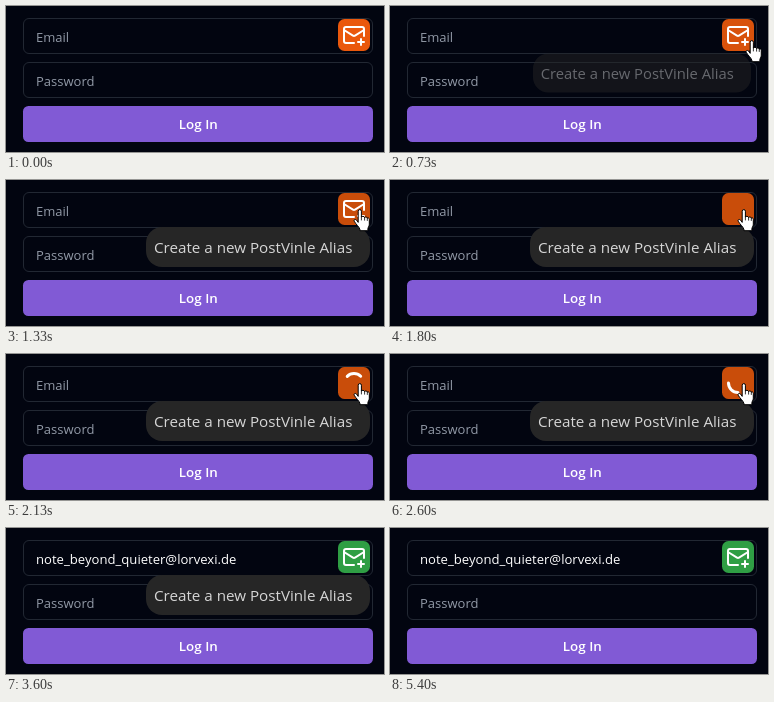
These frames come from a looping animation (378 by 146 pixels, 5.54 s). An HTML page:

```html
<!DOCTYPE html>
<html lang="en">
<head>
<meta charset="utf-8">
<title>Log in with an alias</title>
<style>
  html, body { margin: 0; width: 100%; height: 100%; overflow: hidden; background: #020510; }
  svg { display: block; width: 100%; height: 100%; font: 13px "Open Sans", "Noto Sans", sans-serif; }
  .field { fill: none; stroke: #222833; }
  .hint { fill: #929aa7; }
  .line { fill: none; stroke: #fff; stroke-width: 2; stroke-linecap: round; stroke-linejoin: round; }
</style>
</head>
<body>
<svg viewBox="0 0 378 146">
  <rect width="378" height="146" fill="#020510"/>
  <rect class="field" x="17.5" y="12.5" width="349" height="35" rx="5.5"/>
  <rect class="field" x="17.5" y="56.5" width="349" height="35" rx="5.5"/>
  <text id="hint" class="hint" x="30" y="36">Email</text>
  <text id="mail" x="30" y="35.5" font-size="13.1" fill="#fff">note_beyond_quieter@lorvexi.de</text>
  <text class="hint" x="30" y="80">Password</text>
  <rect x="17" y="100" width="350" height="36" rx="5.5" fill="#815ad5"/>
  <text x="192.3" y="123" font-size="13.4" font-weight="600" fill="#fff" text-anchor="middle">Log In</text>

  <rect id="button" x="332" y="13" width="32" height="32" rx="6.5"/>
  <g id="icon" class="line" transform="translate(336 17)">
    <path d="M22 13V6a2 2 0 0 0-2-2H4a2 2 0 0 0-2 2v12c0 1.1.9 2 2 2h8"/>
    <path d="m22 7-8.97 5.7a1.94 1.94 0 0 1-2.06 0L2 7M19 16v6M16 19h6"/>
  </g>
  <path id="spinner" class="line" style="stroke-width:3" d="M-9.5 0A9.5 9.5 0 0 1 0 -9.5"/>

  <g id="tip">
    <rect x="140" y="47" width="224" height="40" rx="16" fill="#262626"/>
    <text x="148" y="73" font-size="15.2" fill="#d6d6d6">Create a new PostVinle Alias</text>
  </g>

  <g id="hand" stroke="#000" stroke-linejoin="round" stroke-linecap="round">
    <path fill="#fff" d="M5.2 13V2.2a1.6 1.6 0 0 1 3.2 0V8c.5-1 2.9-.9 3.2.5.5-.9 2.5-.7 2.7.7.6-.6 2-.3 2 1v5c0 2-1.5 3-1.5 5.5v1H7v-1C6.5 18 3 15.5 1.2 12.2c-.7-1.4 1-2.4 2.1-1.4z"/>
    <path fill="none" stroke-width=".8" d="M8.4 8v3M11.6 8.5v2.7M14.3 9.2v2.3"/>
  </g>
</svg>
<script>
const LOOP = 5540;
const $ = id => document.getElementById(id);
const [hint, mail, button, icon, spinner, tip, hand] =
  ["hint", "mail", "button", "icon", "spinner", "tip", "hand"].map($);

const ORANGE = [234, 88, 12], ORANGE_HOVER = [201, 77, 10];
const GREEN = [47, 158, 68], GREEN_HOVER = [40, 138, 58];

// Pointer stops: time, x, y
const PATH = [
  [450, 378, 97], [530, 370, 84], [660, 358, 47], [730, 355, 34], [930, 351, 33],
  [1180, 351, 33], [1330, 347, 29], [3340, 347, 29], [3470, 359, 30], [3590, 380, 31]
];

const ramp = (t, from, to) => Math.min(1, Math.max(0, (t - from) / (to - from)));
const mix = (a, b, k) => a + (b - a) * k;
const blend = (a, b, k) => a.map((v, i) => mix(v, b[i], k));
const show = (el, alpha) => el.setAttribute("opacity", alpha);

function pointerAt(t) {
  const i = PATH.findIndex(p => p[0] > t);
  if (i < 1) return [400, 60];
  const [t0, x0, y0] = PATH[i - 1], [t1, x1, y1] = PATH[i];
  const k = ramp(t, t0, t1);
  return [mix(x0, x1, k), mix(y0, y1, k)];
}

function draw(t) {
  const hover = ramp(t, 650, 800) - ramp(t, 3400, 3560);
  const done = ramp(t, 2800, 2950);
  const fill = blend(blend(ORANGE, ORANGE_HOVER, hover), blend(GREEN, GREEN_HOVER, hover), done);
  button.setAttribute("fill", `rgb(${fill.map(Math.round)})`);

  show(icon, 1 - ramp(t, 1590, 1780) + ramp(t, 3040, 3300));
  show(spinner, ramp(t, 1820, 2080) - ramp(t, 2800, 3000));
  const angle = (t - 2038) / 750 * 360;
  spinner.setAttribute("transform", `translate(348 29) rotate(${angle})`);

  const filled = t >= 2800;
  show(hint, filled ? 0 : 1);
  show(mail, filled ? 1 : 0);

  const open = ramp(t, 660, 810);
  show(tip, t < 5400 ? open : 0);
  tip.setAttribute("transform", `translate(252 67) scale(${mix(0.95, 1, open)}) translate(-252 -67)`);

  hand.setAttribute("transform", `translate(${pointerAt(t)})`);
}

const start = performance.now();
function tick() {
  draw((performance.now() - start) % LOOP);
  requestAnimationFrame(tick);
}
tick();
</script>
</body>
</html>
```
